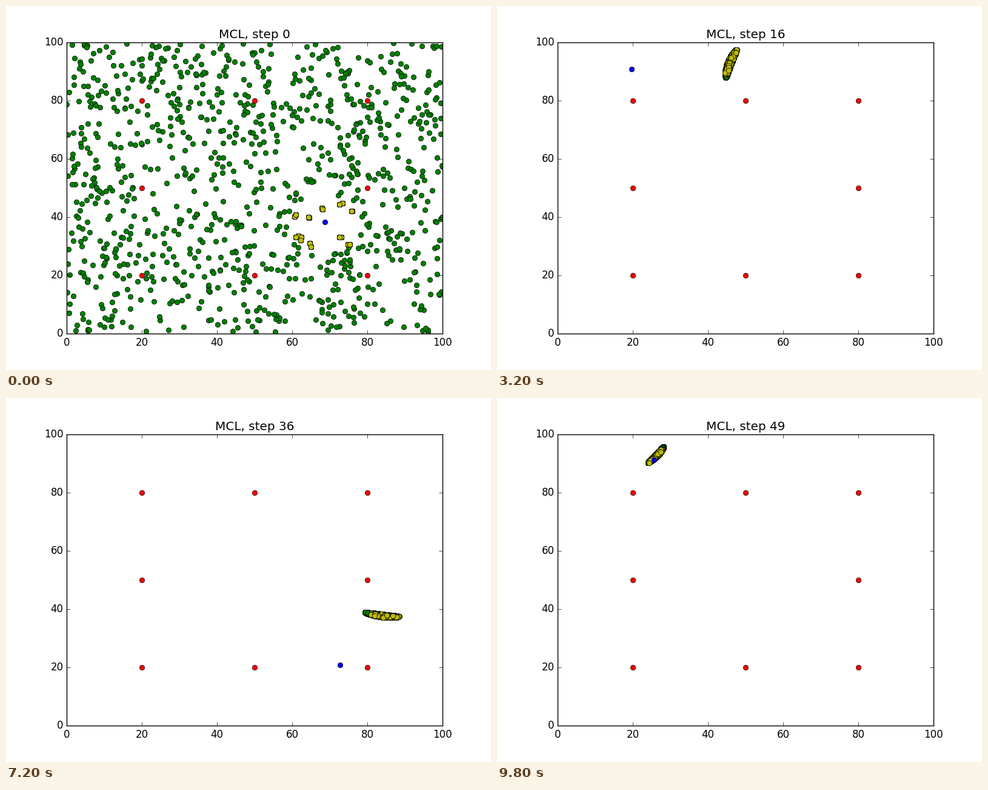
Recreate the animation shown at these times as a matplotlib script. Size 800 px wide and 600 px high, loop 10 s.

```python
import numpy as np
import matplotlib.pyplot as plt
from matplotlib.animation import FuncAnimation

plt.style.use("classic")
plt.rcParams.update({
    "font.family": "DejaVu Sans",
    "figure.dpi": 100,
    "savefig.dpi": 100,
    "figure.facecolor": "white",
    "savefig.facecolor": "white",
})

STEPS = 50
WORLD = 100
COUNT = 1000

# The robot drives a circle: a fixed turn and a fixed distance per step
TURN, SPEED = 0.1, 5.0
RADIUS = SPEED / 2 / np.sin(TURN / 2)
CENTRE = np.array([18.72, 40.8])
START = 1.521

# Where the first measurement leaves particles, two at each spot
SPOTS = [(61, 40.7), (61.2, 33.5), (62.2, 32.5), (65, 30.4), (64.5, 40.1),
         (68.1, 42.9), (73.2, 44.4), (76.3, 42.1), (73, 33.3), (75.2, 31)]

# How far the swarm's estimate is from the robot
KEY_STEPS = [0, 5, 16, 24, 31, 40, 49]
ERROR_X = [8, 21.6, 26.4, 24.4, 19.6, 4.3, 0.5]
ERROR_Y = [-4, -2.7, 1.9, 19.7, 18.8, 16, 1.8]


def robot(k):
    a = START + TURN * k
    return CENTRE + RADIUS * np.array([np.sin(a), -np.cos(a)])


def rotate(v, a):
    c, s = np.cos(a), np.sin(a)
    return np.array([c * v[0] - s * v[1], s * v[0] + c * v[1]])


def wave(k, peak, period):
    return np.cos(2 * np.pi * (k - peak) / period)


def survivors():
    rng = np.random.default_rng(5)
    return np.repeat(SPOTS, 2, axis=0) + rng.normal(0, 0.35, (20, 2))


def scatter():
    rng = np.random.default_rng(12)
    pts = rng.uniform(0, WORLD, (COUNT, 2))
    near = np.hypot(*(pts - robot(0)).T) < 9.7
    return pts[~near], np.tile(survivors(), (COUNT // 20, 1))


def swarm(k, rng):
    """Bent, turning streak of particles and the part that is resampled."""
    half = 4.2 + 0.9 * wave(k, 16, 24)
    angle = np.radians(255 + 4.8 * (k - 16) - 63 * np.exp((5 - k) / 3))
    t = 2 * rng.beta(1.4, 1.4, COUNT) - 1
    t[:2] = -1, 1
    side = np.clip(rng.normal(0, 0.5, COUNT), -1, 1)
    bow = 1 - t ** 2
    local = half * np.array([t, 0.12 * side * np.sqrt(bow) - 0.09 * bow])
    error = np.interp(k, KEY_STEPS, ERROR_X), np.interp(k, KEY_STEPS, ERROR_Y)
    pts = rotate(local, angle).T + robot(k) + error

    # The favoured end swaps back and forth
    shift = 0.35 + 0.65 * wave(k, 6.5, 16.8)
    kept = np.flatnonzero((t >= shift - 1) & (t <= shift + 1))
    return pts, pts[rng.choice(kept, COUNT)]


def strays(k, rng):
    """Small groups that die out during the first steps."""
    turns = np.sort(np.random.default_rng(3).normal(0, 0.7, 20))
    alive = 20 // 2 ** k
    groups = []
    for spot, turn in list(zip(survivors(), turns))[:alive]:
        mid = spot + rotate(robot(k) - robot(0), turn)
        groups.append(mid + rng.normal(0, 0.3 * k, (30, 2)))
    return np.vstack(groups)


def particles(k):
    if k == 0:
        return scatter()
    rng = np.random.default_rng(100 + k)
    green, yellow = swarm(k, rng)
    if k < 5:
        green = np.vstack([green, strays(k, rng)])
    return green % WORLD, yellow % WORLD


fig, ax = plt.subplots(figsize=(8, 6), dpi=100, facecolor="white")
ax.set_xlim(0, WORLD)
ax.set_ylim(0, WORLD)


def dots(color, x=(), y=()):
    return ax.plot(x, y, "o", color=color, mec="k", mew=0.5, ms=6)[0]


landmarks = [(x, y) for x in (20, 50, 80) for y in (20, 50, 80)
             if (x, y) != (50, 50)]
green_dots = dots("g")
yellow_dots = dots((0.75, 0.75, 0))
dots("r", *zip(*landmarks))
blue_dot = dots("b")
title = ax.set_title("")


def draw(k):
    green, yellow = particles(k)
    green_dots.set_data(*green.T)
    yellow_dots.set_data(*yellow.T)
    blue_dot.set_data(*(robot(k) % WORLD).reshape(2, 1))
    title.set_text(f"MCL, step {k}")
    return green_dots, yellow_dots, blue_dot, title


anim = FuncAnimation(fig, draw, frames=STEPS, interval=200,
                     repeat=True, repeat_delay=0, blit=False)
plt.show()
```
